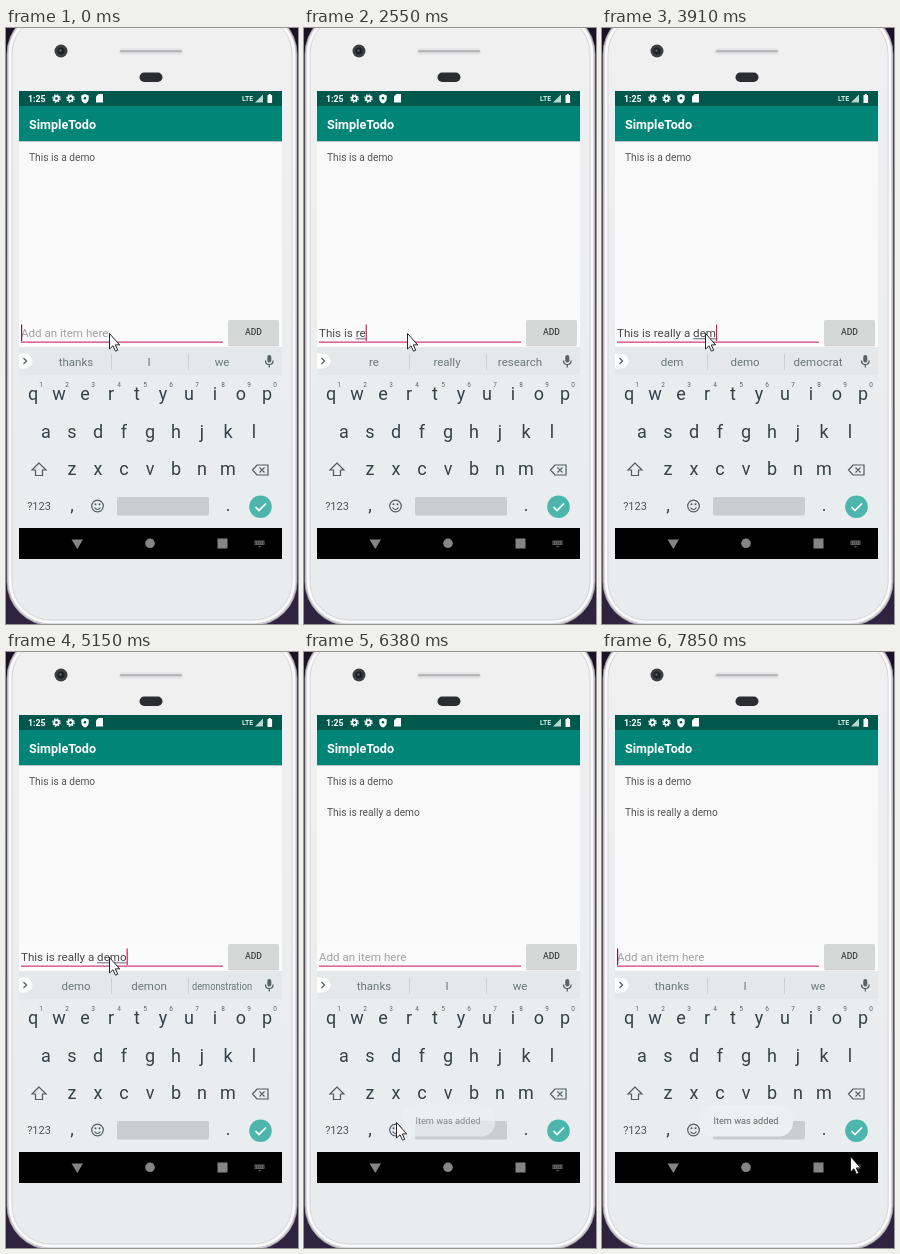
An HTML page for the animation above (8000 ms loop, 292x596 px).

```html
<!DOCTYPE html>
<html lang="en">
<head>
<meta charset="utf-8">
<title>Todo demo</title>
<style>
html, body { margin: 0; height: 100%; overflow: hidden; background: #1d1730; }
svg { display: block; width: 292px; height: 596px; }
text { font-family: Roboto, "Noto Sans", sans-serif; white-space: pre; }
.mid { text-anchor: middle; }
.key { font-size: 18px; fill: #364147; }
.line { fill: none; stroke: #505b60; stroke-width: 1.2; }
</style>
</head>
<body>
<svg id="stage" viewBox="0 0 292 596">
  <defs>
    <g id="gear" fill="none" stroke="#fff">
      <circle r="2.3" stroke-width="1.8"/>
      <circle r="3.7" stroke-width="1.2" stroke-dasharray="1.5 1.4"/>
    </g>
    <linearGradient id="shell" x2="0" y2="1">
      <stop offset=".1" stop-color="#f0f0f1"/>
      <stop offset=".9" stop-color="#e9ebed"/>
    </linearGradient>
    <linearGradient id="desk" x2="0" y2="1">
      <stop offset=".1" stop-color="#191226"/>
      <stop offset="1" stop-color="#2f2340"/>
    </linearGradient>
  </defs>

  <!-- phone body -->
  <rect width="292" height="596" fill="url(#desk)"/>
  <rect x="1" y="-18" width="290" height="615.500" rx="44" fill="#cfced1" stroke="#a19fa5" stroke-width=".8"/>
  <rect x="4" y="-15" width="284" height="609" rx="41" fill="url(#shell)" stroke="#fafafa" stroke-width="2.500"/>
  <rect x="6" y="-13" width="280" height="605" rx="39" fill="none" stroke="#d4d4d7" stroke-width=".8"/>
  <circle cx="55" cy="23" r="6.500" fill="#3c3e42"/>
  <circle cx="55" cy="23" r="3.500" fill="#1d1f23"/>
  <circle cx="54.500" cy="22.500" r="1.300" fill="#56606e"/>
  <rect x="113" y="20.500" width="64" height="6" rx="3" fill="#e2e2e3"/>
  <rect x="114" y="22.300" width="62" height="2" rx="1" fill="#b3b3b5"/>
  <rect x="133.500" y="44.500" width="23" height="9.500" rx="4.700" fill="#2c2d30"/>

  <!-- status and title bars -->
  <rect x="13" y="63" width="263" height="256" fill="#f9f9f9"/>
  <rect x="13" y="291" width="263" height="28" fill="#fbfbfb"/>
  <rect x="13" y="63" width="263" height="15" fill="#00574b"/>
  <rect x="13" y="78" width="263" height="35" fill="#008577"/>
  <rect x="13" y="113" width="263" height="1" fill="#b9c6c3"/>
  <g fill="#fff">
    <text x="22" y="73.500" font-size="8.800" font-weight="700">1:25</text>
    <use href="#gear" x="50.500" y="70.500"/>
    <use href="#gear" x="64.500" y="70.500"/>
    <path d="M79 66l3.700 1.500v3q0 3.500-3.700 5q-3.700-1.500-3.700-5v-3z"/>
    <circle cx="79" cy="70.300" r="1.300" fill="#00574b"/>
    <path d="M92.500 66h4.500v8.500h-7v-6z"/>
    <text x="236" y="73.300" font-size="7" font-weight="500">LTE</text>
    <path d="M249 74.500h8v-8z" opacity=".75"/>
    <path d="M261.500 67h1.300v-1h2v1h1.300v8h-4.600z"/>
    <text x="23" y="101" font-size="12.600" font-weight="700">SimpleTodo</text>
  </g>

  <!-- list and entry row -->
  <g font-size="10.200" fill="#555">
    <text x="23" y="133">This is a demo</text>
    <text id="added" x="23" y="164">This is really a demo</text>
  </g>
  <text id="hint" x="15" y="309" font-size="11.600" fill="#a0a0a0">Add an item here</text>
  <text id="entry" x="15" y="309" font-size="11.600" fill="#484848"></text>
  <rect id="compose" y="310.300" height="1" fill="#666"/>
  <rect x="15" y="313.500" width="202" height="1.300" fill="#d4477e"/>
  <rect id="caret" y="296.500" width="1.200" height="16.500"/>
  <rect x="222" y="317" width="51" height="1.200" rx="1" fill="#cdcdcd"/>
  <rect id="button" x="222" y="292" width="51" height="25" rx="1.500"/>
  <text class="mid" x="247.500" y="307.200" font-size="8.600" font-weight="500" fill="#444">ADD</text>

  <!-- keyboard -->
  <rect x="13" y="319" width="263" height="181" fill="#e9edf0"/>
  <rect x="13" y="319" width="263" height="28" fill="#e4e8eb"/>
  <path d="M13 325.500h6a7.500 7.500 0 0 1 0 15h-6z" fill="#fff"/>
  <path class="line" d="M17.500 330l3 3-3 3"/>
  <path d="M105.500 326v16M182.500 326v16" stroke="#ccd1d4"/>
  <rect x="261.300" y="327" width="4" height="7.500" rx="2" fill="#566166"/>
  <path class="line" d="M259.500 332.500q0 4 3.800 4t3.800-4M263.300 336.500v3"/>
  <g id="hints" font-size="11.500" fill="#6b777d"></g>
  <g id="keys"></g>
  <path class="line" d="M33 435l-7 7h3.500v5.500h7v-5.500h3.500z"/>
  <path class="line" d="M246.500 442l4.500-5h11v10h-11zM253.500 439.500l5 5m0-5l-5 5"/>
  <text class="mid" x="33" y="482" font-size="11" fill="#4a555a">?123</text>
  <circle class="line" cx="91.500" cy="478" r="5.800"/>
  <path class="line" d="M88.500 479.500q3 4 6 0"/>
  <circle cx="89.500" cy="476.300" r="1" fill="#505b60"/>
  <circle cx="93.500" cy="476.300" r="1" fill="#505b60"/>
  <rect x="111" y="469" width="92" height="18.500" rx="1.500" fill="#c9cdd0"/>
  <circle cx="254.500" cy="478.700" r="11.300" fill="#4db6ac"/>
  <path d="M249.500 479l3.500 3.500 7-7" fill="none" stroke="#fff" stroke-width="1.700"/>

  <!-- navigation bar -->
  <rect x="13" y="500" width="263" height="31" fill="#000"/>
  <g fill="#858585">
    <path d="M65.500 511.500h11.500l-5.700 9.500z"/>
    <circle cx="144" cy="515.300" r="4.800"/>
    <rect x="211.500" y="510.500" width="10" height="10"/>
    <path d="M248.500 512.500h10v4.500h-10zM252 518h3l-1.500 1.700z" opacity=".75"/>
  </g>
  <path d="M249 514h9M249 515.700h9" stroke="#222" stroke-width=".8" stroke-dasharray="1 1"/>

  <g id="toast">
    <rect x="97" y="453" width="94" height="31.500" rx="14" fill="#edf0f2"/>
    <text class="mid" x="144" y="472" font-size="9.200" fill="#666">Item was added</text>
  </g>
  <path id="mouse" d="M.5.5V16L4 12.800 6.500 18.200 8.700 17.200 6.300 11.900H10.700Z" fill="#fff" stroke="#111" stroke-width=".9"/>
</svg>
<script>
const LOOP = 8000;
const $ = id => document.getElementById(id);

function addText(parent, x, y, text, attrs) {
  const el = document.createElementNS("http://www.w3.org/2000/svg", "text");
  Object.entries({ x, y, class: "mid", ...attrs }).forEach(([k, v]) => el.setAttribute(k, v));
  el.textContent = text;
  parent.append(el);
  return el;
}

[["qwertyuiop", 27, 372], ["asdfghjkl", 40, 410], ["zxcvbnm", 66, 447]].forEach(([row, x0, y], r) =>
  [...row].forEach((c, i) => {
    const x = x0 + i * 26;
    addText($("keys"), x, y, c, { class: "mid key" });
    if (!r) addText($("keys"), x + 8, 359, (i + 1) % 10, { "font-size": 6.5, fill: "#5c666b" });
  }));
addText($("keys"), 66, 483, ",", { class: "mid key" });
addText($("keys"), 222, 483, ".", { class: "mid key" });
const slots = [70, 143, 216].map(x => addText($("hints"), 0, 0, "", { "data-x": x }));

// Each track holds [start time, value...] and keeps its value until the next entry.
const typed = [
  [0, ""], [1210, "Th"], [1500, "This"], [1640, "This "], [1760, "This i"], [1910, "This is "],
  [2310, "This is r"], [2550, "This is re"], [2670, "This is rea"], [2820, "This is real"],
  [2970, "This is really"], [3090, "This is really "], [3210, "This is really a "],
  [3640, "This is really a d"], [3760, "This is really a de"], [3910, "This is really a dem"],
  [4030, "This is really a demo"], [5870, ""]
];
const words = [
  [0, "thanks I we"], [1210, "the this there"], [1500, "this thus these"], [1640, "was is morning"],
  [1760, "i is in"], [1910, "a the not"], [2310, "r right really"], [2430, "r really right"],
  [2550, "re really research"], [2670, "rea really reading"], [2970, "really real reality"],
  [3090, "good a great"], [3210, "big good great"], [3640, "d day different"],
  [3760, "de demo dear"], [3910, "dem demo democrat"], [4030, "demo demon demonstration"],
  [6260, "thanks I we"]
];
const blink = [
  [0, 1], [460, 0], [900, 1], [4590, 0], [5150, 1], [5600, 0], [5870, 1],
  [6380, 0], [6920, 1], [7430, 0], [7850, 1]
];
const pointer = [
  [0, 103, 305], [5300, 205, 302], [5450, 227, 303], [5600, 240, 303], [5870, 228, 330],
  [5990, 180, 411], [6110, 145, 454], [6260, 110, 515], [6380, 92, 470], [6500, 84, 424],
  [6650, 100, 438], [6770, 118, 451], [6920, 148, 432], [7040, 160, 413], [7190, 180, 446],
  [7310, 140, 330], [7430, 103, 223], [7580, 150, 300], [7700, 205, 375], [7850, 248, 504]
];
const toast = [[0, 0], [6260, .3], [6380, .7], [6500, 1]];
const at = (track, t) => track.filter(s => s[0] <= t).pop().slice(1);

function suggest(list) {
  slots.forEach((el, i) => {
    el.textContent = list[i];
    const squeeze = Math.min(1, 60 / el.getComputedTextLength());
    el.setAttribute("transform", `translate(${el.dataset.x} 337.5) scale(${squeeze} 1)`);
  });
}

function showEntry(text) {
  const entry = $("entry");
  const widthOf = s => (entry.textContent = s) ? entry.getComputedTextLength() : 0;
  const start = widthOf(text.slice(0, text.lastIndexOf(" ") + 1));
  const end = widthOf(text);
  $("compose").setAttribute("x", 15 + start);
  $("compose").setAttribute("width", end - start);
  $("caret").setAttribute("x", 15 + end);
  $("caret").setAttribute("fill", text ? "#d81b60" : "#5e2a41");
  $("hint").style.opacity = text ? 0 : 1;
}

function draw(t) {
  showEntry(at(typed, t)[0]);
  suggest(at(words, t)[0].split(" "));
  $("caret").style.opacity = at(blink, t)[0];
  $("button").setAttribute("fill", t >= 5750 && t < 6110 ? "#bdbdbd" : "#d6d7d7");
  $("added").style.opacity = t >= 6110 ? 1 : 0;
  $("toast").style.opacity = at(toast, t)[0];
  $("mouse").setAttribute("transform", `translate(${at(pointer, t)})`);
}

function tick() {
  draw(performance.now() % LOOP);
  requestAnimationFrame(tick);
}
tick();
</script>
</body>
</html>
```
